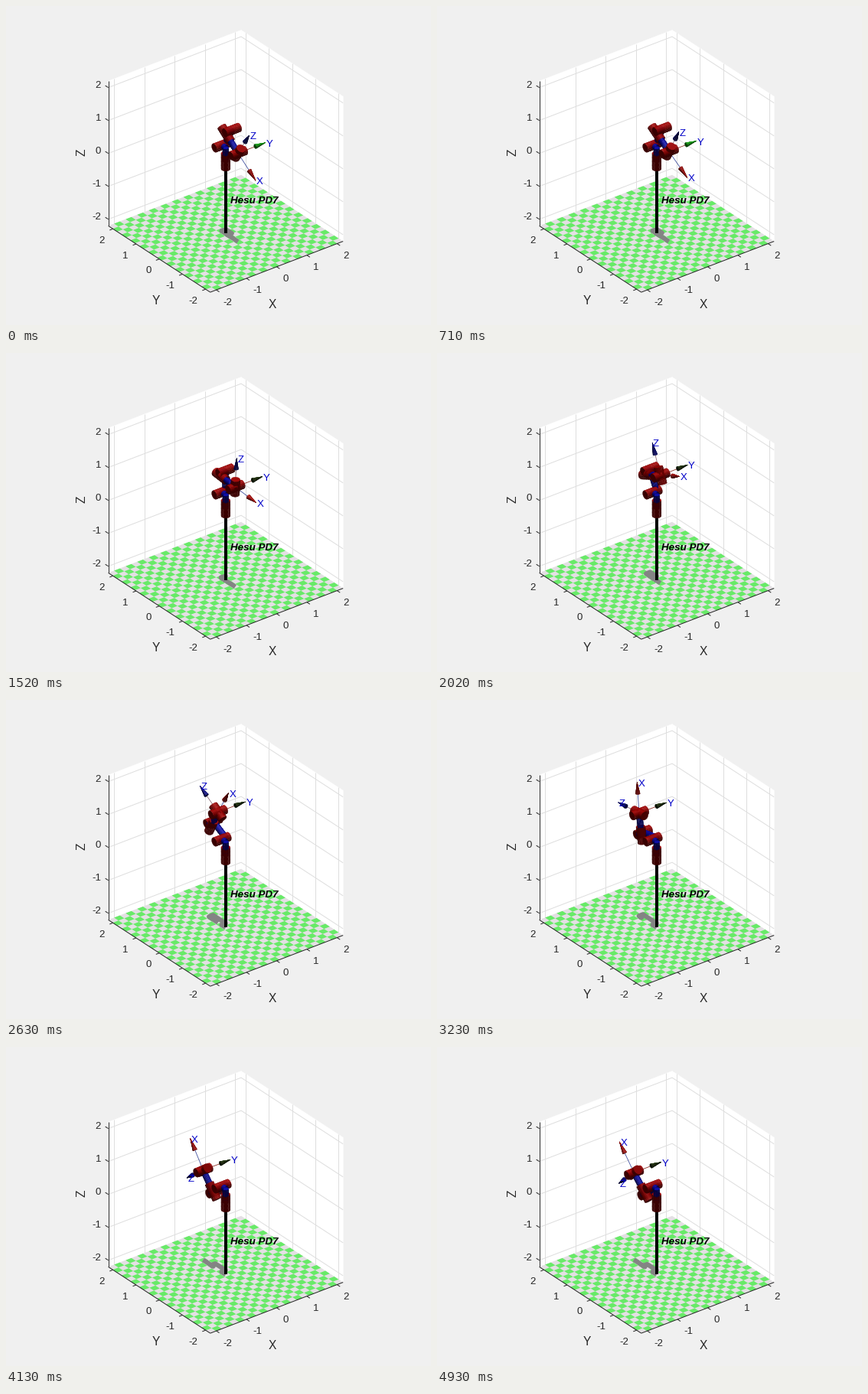
Animation, 555 px wide and 417 px high, one loop 5180 ms. Source, as a matplotlib script:

```python
import numpy as np
import matplotlib.pyplot as plt
from matplotlib.animation import FuncAnimation
from matplotlib.collections import LineCollection, PolyCollection

W, H, DPI = 555, 417, 64
PX = 72 / DPI
LIM = 2.2
TILES = 23
STEPS = 50
INTERVAL, TICKS = 20, 259

# Orthographic camera: azimuth -37.5 deg, elevation 30 deg
AZ, EL = np.radians([37.5, 30])
VIEW = np.array([-np.sin(AZ) * np.cos(EL), -np.cos(AZ) * np.cos(EL), np.sin(EL)])
SCALE = 49.7
UP = np.array([0, 0, 1.0])
HALF = (VIEW + UP) / np.linalg.norm(VIEW + UP)

RED, BLUE = (0.95, 0.02, 0.02), (0.06, 0.06, 1.0)
CONE_X, CONE_Z = (1.0, 0.06, 0.04), (0.05, 0.05, 0.75)
GREEN, OLIVE = (0.1, 1.0, 0.1), (0.16, 0.28, 0.05)
INK = (0.15, 0.15, 0.15)


def project(p):
    x, y, z = np.moveaxis(np.asarray(p, float), -1, 0)
    u = 286.4 + SCALE * (np.cos(AZ) * x - np.sin(AZ) * y)
    v = 202.3 - SCALE * (np.sin(EL) * (np.sin(AZ) * x + np.cos(AZ) * y) + np.cos(EL) * z)
    return np.stack([u, v], axis=-1)


def shade(color, normal):
    spec = 0.12 * max(normal @ HALF, 0) ** 12
    level = 0.2 + 0.06 * max(normal @ VIEW, 0) + 0.4 * max(normal[2], 0)
    return tuple(np.clip(np.array(color) * level + spec, 0, 1))


def tube(start, end, r0, color, r1=None):
    """Visible facets of a cylinder or cone as (depth, polygon, colour)."""
    r1 = r0 if r1 is None else r1
    start, end = np.asarray(start, float), np.asarray(end, float)
    length = np.linalg.norm(end - start)
    axis = (end - start) / length
    side = np.cross(axis, (0.31, 0.87, 0.38))
    side /= np.linalg.norm(side)
    other = np.cross(axis, side)
    angles = np.linspace(0, 2 * np.pi, 21)
    ring = np.outer(np.cos(angles), side) + np.outer(np.sin(angles), other)
    cuts = np.linspace(0, 1, int(np.ceil(length / 0.13)) + 1)
    rows = [start + axis * length * c + ring * (r0 + (r1 - r0) * c) for c in cuts]
    facets = []

    def add(points, normal):
        if normal @ VIEW > 0:
            facets.append((points.mean(axis=0) @ VIEW, project(points), shade(color, normal)))

    for k in range(20):
        normal = ring[k] + ring[k + 1] + 2 * axis * (r0 - r1) / length
        normal /= np.linalg.norm(normal)
        for a, b in zip(rows, rows[1:]):
            add(np.array([a[k], a[k + 1], b[k + 1], b[k]]), normal)
    add(rows[0][:-1], -axis)
    if r1 > 0:
        add(rows[-1][:-1], axis)
    return facets


def planar(deg):
    a = np.radians(deg)
    return np.array([0, np.cos(a), np.sin(a)])


def joint(center, axis):
    half = 0.235 * np.asarray(axis, float)
    return tube(center - half, center + half, 0.12, RED)


def pose(step):
    """Arm points, forearm direction and tool axes at a step."""
    t = step / (STEPS - 1)
    s = t ** 3 * (10 - 15 * t + 6 * t * t)
    upper = 116.6 - 164.1 * s
    fore = 304.5 - 174.5 * s
    tool = 212.5 - 166.5 * s
    shift = np.array([0.135, 0, 0])
    base = np.zeros(3)
    column = np.array([0, 0, 0.4])
    shoulder = np.array([0, 0.18, 0.4])
    elbow = shoulder + shift + 0.6 * planar(upper)
    bend = elbow - shift + 0.12 * planar(fore)
    wrist = bend + 0.62 * planar(fore - 90)
    arm = np.array([base, column, shoulder, shoulder + shift, elbow,
                    elbow - shift, bend, wrist])
    axes = [planar(tool), np.array([1.0, 0, 0]), planar(tool - 90)]
    return arm, planar(fore - 90), axes


fig = plt.figure(figsize=(W / DPI, H / DPI), dpi=DPI, facecolor="#f0f0f0")
ax = fig.add_axes([0, 0, 1, 1])
ax.set_xlim(-0.5, W - 0.5)
ax.set_ylim(H - 0.5, -0.5)
ax.axis("off")


def label(x, y, text, size=13.3, color=INK, ha="center", **kw):
    return ax.text(x, y, text, fontsize=size * PX, color=color, ha=ha,
                   va="center_baseline", family="Liberation Sans", **kw)


def segments(lines, color, width=1, z=1):
    ax.add_collection(LineCollection([project(p) for p in lines], colors=[color],
                                     linewidths=width * PX, zorder=z))


def draw_room():
    lo, hi = -LIM, LIM
    walls = [[(lo, hi, lo), (lo, hi, hi), (hi, hi, hi), (hi, hi, lo)],
             [(hi, hi, lo), (hi, hi, hi), (hi, lo, hi), (hi, lo, lo)],
             [(lo, lo, lo), (lo, hi, lo), (hi, hi, lo), (hi, lo, lo)]]
    ax.add_collection(PolyCollection([project(w) for w in walls[:2]], facecolors="white",
                                     edgecolors="white", linewidths=0.5, zorder=0))
    ax.add_collection(PolyCollection([project(walls[2])], facecolors="#e3e0e3", zorder=1))
    edges = np.linspace(lo, hi, TILES + 1)
    tiles = []
    for i in range(TILES):
        for j in range(1 - i % 2, TILES, 2):
            x0, x1, y0, y1 = *edges[i:i + 2], *edges[j:j + 2]
            tiles.append(project([(x0, y0, lo), (x1, y0, lo), (x1, y1, lo), (x0, y1, lo)]))
    ax.add_collection(PolyCollection(tiles, facecolors="#68ea68", zorder=1.5))

    grid = []
    for t in range(-2, 3):
        grid += [[(t, hi, lo), (t, hi, hi)], [(hi, t, lo), (hi, t, hi)],
                 [(lo, hi, t), (hi, hi, t), (hi, lo, t)]]
    segments(grid, "#dedede", 1, 1)
    segments([[(lo, lo, lo), (hi, lo, lo)], [(lo, lo, lo), (lo, hi, lo)],
              [(lo, hi, lo), (lo, hi, hi)]], INK, 1, 3)

    ticks = []
    for t in range(-2, 3):
        ticks += [[(t, lo, lo), (t, lo - 0.13, lo)], [(lo, t, lo), (lo - 0.11, t, lo)],
                  [(lo, hi, t), (lo, hi + 0.13, t)]]
        u, v = project((t, lo, lo))
        label(u + 8.4, v + 15, str(t), ha="left")
        u, v = project((lo, t, lo))
        label(u - 10.5, v + 14, str(t), ha="right")
        u, v = project((lo, hi, t))
        label(123.6, v - 4, str(t), ha="right")
    segments(ticks, INK, 1, 3)
    label(347.3, 388.5, "X", 15.5)
    label(195.3, 383.5, "Y", 15.5)
    label(98, 192, "Z", 15.5, rotation=90)


draw_room()
shadow, = ax.plot([], [], color="#848484", lw=6 * PX, solid_capstyle="butt",
                  solid_joinstyle="round", zorder=2)
segments([[(0, 0, -LIM), (0, 0, 0)]], "black", 4, 4)
rays = LineCollection([], colors=["#3a4a9c", "#8a2c22", "#8a6a72"],
                      linewidths=0.8 * PX, zorder=5)
ax.add_collection(rays)
body = PolyCollection([], linewidths=0.35, zorder=6)
ax.add_collection(body)
label(292.2, 252.5, "Hesu PD7", 13.4, "black", "left", weight="bold", style="italic", zorder=8)
names = [label(0, 0, c, 13.3, "#0000c8", "left", zorder=8) for c in "XYZ"]

order = np.arange(STEPS)
STARTS = 100 * order + 30 * np.minimum(order / 24, 1)


def draw_step(step):
    arm, forearm, axes = pose(step)
    wrist = arm[-1]
    facets = []
    for a, b in zip(arm, arm[1:]):
        facets += tube(a, b, 0.08, BLUE)
    side = (1, 0, 0)
    for center, axis in [(arm[0], UP), (arm[2], side), (arm[4], side),
                         (arm[6], forearm), (wrist, side), (wrist, axes[2])]:
        facets += joint(center, axis)

    lines = []
    cones = (CONE_X, GREEN if step < 12 else OLIVE, CONE_Z)
    for axis, color, name in zip(axes, cones, names):
        tip = wrist + 0.9 * axis
        facets += tube(wrist + 0.57 * axis, tip, 0.06, color, 0)
        lines.append(project([wrist, tip]))
        u, v = project(tip)
        name.set_position((u + 1, v + 0.5))
    rays.set_segments(lines)

    facets.sort(key=lambda f: f[0])
    colors = [f[2] for f in facets]
    body.set_verts([f[1] for f in facets])
    body.set_facecolor(colors)
    body.set_edgecolor(colors)

    ground = arm.copy()
    ground[:, 2] = -LIM
    shadow.set_data(*project(ground).T)


def update(tick):
    time = tick * INTERVAL + INTERVAL / 2
    draw_step(int(np.searchsorted(STARTS, time, side="right")) - 1)
    return []


anim = FuncAnimation(fig, update, frames=TICKS, interval=INTERVAL,
                     repeat=True, repeat_delay=0, blit=False)
plt.show()
```
